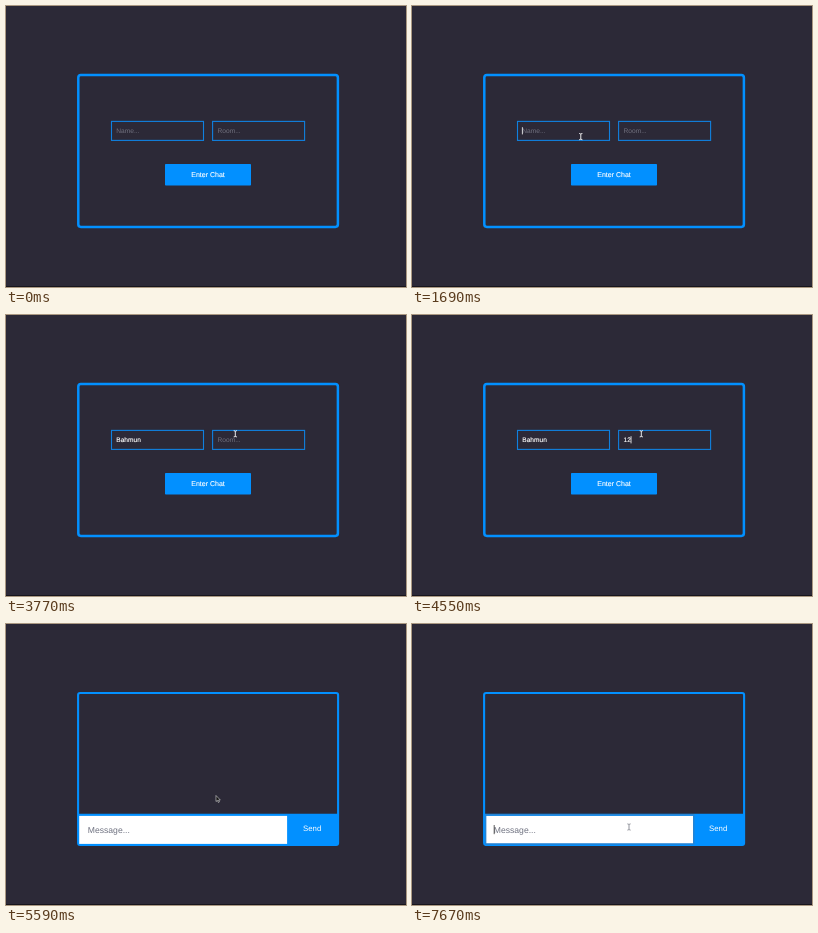
These frames come from a looping animation (400 by 281 pixels, 8000 ms). An HTML page:

```html
<!DOCTYPE html>
<html lang="en">
<head>
<meta charset="utf-8">
<title>Chat login</title>
<style>
  html, body { margin: 0; width: 100%; height: 100%; overflow: hidden; background: #2c2937; }
  svg { display: block; width: 100vw; height: 100vh; }
  text { font-family: "Liberation Sans", Arial, sans-serif; text-rendering: geometricPrecision; }
  .field { fill: none; stroke: #1080df; stroke-width: 1.1; }
  .value { font-size: 6.6px; }
  .label { fill: #fff; stroke: #fff; stroke-width: .14; text-anchor: middle; }
  .caret { stroke-width: .8; }
</style>
</head>
<body>
<svg viewBox="0 0 400 281" preserveAspectRatio="none">
  <rect width="400" height="281" fill="#2c2937"/>
  <rect y="280" width="400" height="1" fill="#17151d"/>

  <g id="login">
    <rect x="72.3" y="69.1" width="259.6" height="151.8" rx="2.6" fill="none" stroke="#0290ff" stroke-width="2.5"/>
    <rect class="field" x="105.5" y="115.4" width="92" height="19"/>
    <rect class="field" x="206.6" y="115.4" width="92" height="19"/>
    <text id="name" class="value" x="110.3" y="127.2"></text>
    <text id="room" class="value" x="211.6" y="127.2"></text>
    <rect id="enter" x="159" y="158" width="86" height="21.6" rx=".8"/>
    <text class="label" x="202" y="171.2" font-size="7">Enter Chat</text>
  </g>

  <g id="chat">
    <rect x="72.1" y="69" width="260" height="152" rx="2" fill="none" stroke="#0290ff" stroke-width="2.1"/>
    <path d="M72 189.8H332V221H72Z" fill="#0290ff"/>
    <rect x="73.2" y="191.9" width="207.9" height="28" fill="#fff"/>
    <rect id="ring" x="73.6" y="190.8" width="208.2" height="29.2" rx=".6" fill="none" stroke="#2583d3" stroke-width="1.5"/>
    <text x="81.8" y="208.5" font-size="8.6" fill="#6f7280">Message...</text>
    <text class="label" x="306.2" y="207.3" font-size="7.8" style="stroke:none">Send</text>
  </g>

  <line id="caret" class="caret"/>

  <g id="pointer">
    <path id="beam" d="M-1.6-3.1Q0-3.1 0-2.3Q0-3.1 1.6-3.1M0-2.4V2.4M-1.6 3.1Q0 3.1 0 2.3Q0 3.1 1.6 3.1" fill="none" stroke-width=".9"/>
    <path id="arrow" d="M0 0V6L1.4 4.8L2.4 7L3.4 6.5L2.5 4.5H4.3Z" fill="#111" stroke="#fff" stroke-width=".5"/>
    <path id="hand" d="M-.7-1.6Q-.7-2.3 0-2.3T.7-1.6V.1L2.5.5Q3.2.7 3 1.7L2.5 4.4H-.8L-2.3 2Q-2.6 1.2-1.8 1.1L-.7 1.8Z" fill="#fff" stroke="#26232e" stroke-width=".45"/>
  </g>
</svg>

<script>
const LOOP = 8000, TICK = 130, CHAT_AT = 5590;
const $ = id => document.getElementById(id);
const show = (id, on) => $(id).setAttribute("visibility", on ? "visible" : "hidden");
const set = (id, attrs) => {
  for (const key in attrs) $(id).setAttribute(key, attrs[key]);
};

const entries = {
  name: { text: "Bahmun", hint: "Name...", keys: [2080, 2210, 2340, 2340, 2470, 2600] },
  room: { text: "123", hint: "Room...", keys: [4420, 4550, 4680] }
};

// start, end, from, to
const moves = [
  [0, 520, [300, 290], [168.8, 130.6]],
  [3120, 3770, [168.8, 130.6], [229.3, 118.8]],
  [4680, 5200, [229.3, 118.8], [210, 171.5]],
  [5720, 6500, [210, 171.5], [217, 203]]
];

// field, on, off
const carets = [
  ["name", 650, 1170], ["name", 1690, 3120],
  ["room", 3900, 5200],
  ["message", 6630, 7150], ["message", 7670, LOOP]
];

const ease = u => u * u * (3 - 2 * u);
const inside = ([x, y], l, t, r, b) => x >= l && x <= r && y >= t && y <= b;

function pointerAt(t) {
  const [start, end, a, b] = moves.filter(m => t >= m[0]).pop();
  const u = ease(Math.min(1, (t - start) / (end - start)));
  return a.map((v, i) => v + (b[i] - v) * u);
}

function drawEntry(id, t) {
  const { text, hint, keys } = entries[id];
  const typed = text.slice(0, keys.filter(k => t >= k).length);
  $(id).textContent = typed || hint;
  set(id, typed
    ? { fill: "#fff", stroke: "#fff", "stroke-width": .14 }
    : { fill: "#71717f", stroke: "none" });
  return typed ? $(id).getComputedTextLength() : 0;
}

function drawCaret(t, ends) {
  const hit = carets.find(c => t >= c[1] && t < c[2]);
  show("caret", hit);
  if (!hit) return;
  const message = hit[0] === "message";
  const x = message ? 82.2 : ends[hit[0]];
  set("caret", {
    x1: x, x2: x,
    y1: message ? 201 : 121.2,
    y2: message ? 210.2 : 128.4,
    stroke: message ? "#333" : "#fff"
  });
}

function drawPointer(t, chat) {
  const p = pointerAt(t);
  const onMessage = chat && inside(p, 73, 192, 281, 220);
  const onField = !chat && (inside(p, 105, 115, 198, 135) || inside(p, 206, 115, 299, 135));
  const onButton = !chat && inside(p, 159, 158, 245, 180);
  show("beam", onMessage || onField);
  show("hand", onButton);
  show("arrow", !onMessage && !onField && !onButton);
  set("beam", { stroke: onMessage ? "#858790" : "#fff" });
  set("pointer", { transform: `translate(${p})` });
  set("enter", { fill: onButton ? "#037fde" : "#0290ff" });
}

function draw(time) {
  const t = Math.floor(time / TICK) * TICK;
  const chat = t >= CHAT_AT;
  $("login").style.display = chat ? "none" : "";
  $("chat").style.display = chat ? "" : "none";
  const ends = {};
  if (!chat) {
    ends.name = 110.4 + drawEntry("name", t);
    ends.room = 211.7 + drawEntry("room", t);
  }
  show("ring", chat && t >= 6630);
  drawCaret(t, ends);
  drawPointer(t, chat);
}

const began = performance.now();
function frame() {
  draw((performance.now() - began) % LOOP);
  requestAnimationFrame(frame);
}
frame();
</script>
</body>
</html>
```
